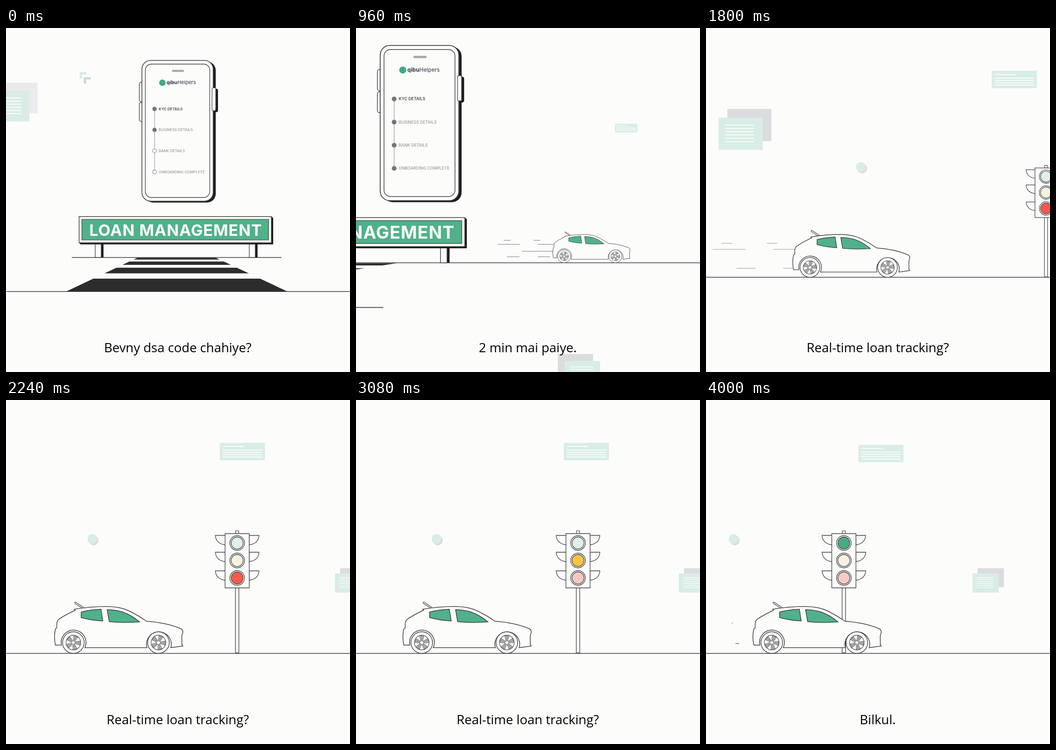
Write an HTML page with a canvas that moves like this. It is 748 px wide and 748 px high and loops after 4040 ms.

```html
<!DOCTYPE html>
<html lang="en">
<head>
<meta charset="utf-8">
<title>Loan journey</title>
<style>
html, body { margin: 0; width: 100%; height: 100%; overflow: hidden; background: #fcfdfb; }
canvas { display: block; width: 748px; height: 748px; }
</style>
</head>
<body>
<canvas id="stage" width="748" height="748"></canvas>
<script>
const ctx = document.getElementById('stage').getContext('2d');
const LOOP = 4040, STEP = 40;
const BG = '#fcfdfb', INK = '#3c3d3e', BLACK = '#1e1f20', GREEN = '#50b18a';
const MINT = '#d8ede6', MIST = '#dcdce0';

// Smooth monotone curve through [time, value] points, held at both ends.
function curve(...k) {
  const secant = i => (k[i + 1][1] - k[i][1]) / (k[i + 1][0] - k[i][0]);
  const slope = i => {
    if (i === 0) return secant(0);
    if (i === k.length - 1) return 0;
    const a = secant(i - 1), b = secant(i);
    return a * b > 0 ? 2 * a * b / (a + b) : 0;
  };
  return t => {
    if (t >= k[k.length - 1][0]) return k[k.length - 1][1];
    let i = 0;
    while (t > k[i + 1][0]) i++;
    const h = k[i + 1][0] - k[i][0], u = (t - k[i][0]) / h, v = 1 - u;
    return k[i][1] * v * v * (1 + 2 * u) + k[i + 1][1] * u * u * (3 - 2 * u)
      + h * u * v * (slope(i) * v - slope(i + 1) * u);
  };
}

const pos = v => Math.max(0, v);
const ramp = (t, a, b) => Math.min(1, pos((t - a) / (b - a)));

const carZoom = curve([0, 0.49], [520, 0.545], [960, 0.603], [1360, 0.754], [2240, 1]);
const carX = curve([0, 440], [520, 542], [960, 564], [1360, 495.5], [2240, 331.5], [3080, 328]);
const ground = t => 551 - 102 * (1 - carZoom(t));
// How far the opening scene has slid to the left, and its zoom.
const slide = t => 340 * (t / 960) ** 4.6;
const signZoom = t => 1 + 0.103 * (t / 960) ** 3;
// Distance left to the traffic light's stop: braking, then setting off again.
const start = t => pos((t - 3322) / 678) ** 3;
const pan = t => 1000 * pos((2567 - t) / 1207) ** 3 - 183 * start(t);

function paint(fill, stroke, width = 1.4) {
  if (fill) { ctx.fillStyle = fill; ctx.fill(); }
  if (stroke) { ctx.strokeStyle = stroke; ctx.lineWidth = width; ctx.stroke(); }
}
function box(x, y, w, h, fill, stroke, width, r = 0) {
  ctx.beginPath();
  ctx.roundRect(x, y, w, h, r);
  paint(fill, stroke, width);
}
function disc(x, y, r, fill, stroke, width) {
  ctx.beginPath();
  ctx.arc(x, y, r, 0, 7);
  paint(fill, stroke, width);
}
function line(x0, y0, x1, y1, color = INK, width = 1.6) {
  ctx.beginPath();
  ctx.moveTo(x0, y0);
  ctx.lineTo(x1, y1);
  paint(null, color, width);
}
function poly(points, fill) {
  ctx.beginPath();
  points.forEach(p => ctx.lineTo(...p));
  ctx.closePath();
  paint(fill);
}
function label(str, x, y, font, color, align = 'left') {
  ctx.font = font;
  ctx.fillStyle = color;
  ctx.textAlign = align;
  ctx.fillText(str, x, y);
}
function group(draw, x, y, s, alpha = 1) {
  ctx.save();
  ctx.translate(x, y);
  ctx.scale(s, s);
  ctx.globalAlpha = alpha;
  draw();
  ctx.restore();
}

// Two overlapping sheets; x, y is the corner of the front one.
function sheets(x, y, s, side = 1, back = MIST) {
  group(() => {
    box(19 * side, -19, 96, 70, back);
    box(0, 0, 96, 70, MINT);
    for (let i = 0; i < 6; i++) line(15, 16 + i * 7.2, 77, 16 + i * 7.2, '#fbfdf6', 2.2);
  }, x, y, s);
}
function wideCard(x, y, s, alpha = 1) {
  group(() => {
    box(0, 0, 98, 38, MINT);
    line(6, 8, 54, 8, '#fbfdfb', 1.8);
    for (let i = 0; i < 4; i++) line(6, 16 + i * 5, 92, 16 + i * 5, '#fbfdfb', 1.8);
  }, x, y, s, alpha);
}
function corner(x, y, color) {
  box(x, y, 15, 5, color);
  box(x, y, 5.5, 14, color);
}

function scenery(t) {
  const d = pan(t), e = slide(t), u = t - 960;
  if (u < 0) {
    sheets(-40 - 1.25 * e, 137, 0.945, 1, '#ebebed');
    corner(169 - e, 107, '#d6d6d8');
    corner(160 - e, 96, MINT);
  }
  if (Math.abs(u) < 320) sheets(454 - 0.9 * u, 724 + 0.0006 * u * u, 0.8, -1);
  wideCard(563, 208, 0.5, pos(1 - Math.abs(u) / 160));
  sheets(518 + 0.66 * (d - 1000), 195, 1);
  wideCard(452 + 0.66 * d, 93 + 4.5 * start(t), 1);
  sheets(702 + 0.67 * d, 377, 0.595);
  disc(178 + 0.63 * d, 305.5, 10.5, '#dcdcdc');
  disc(175 + 0.63 * d, 302, 10.5, MINT);
}

function road(t) {
  const g = ground(t), e = slide(t), h = 74 + 0.068 * e;
  line(143 - 1.13 * e, g, 599 + 0.23 * t, g);
  line(-5, g + h, 780 - 2.12 * e, g + h);
  const left = y => 287 - 1.12 * e - (2.11 + 0.026 * e) * y;
  const right = y => 455 - 1.06 * e + (2.12 - 0.0253 * e) * y;
  for (const [a, b] of [[0.01, 0.06], [0.12, 0.216], [0.3, 0.466], [0.622, 1]]) {
    const p = a * h, q = b * h;
    poly([[left(p), g + p], [right(p), g + p], [right(q), g + q], [left(q), g + q]], '#2b2c2c');
  }
}

function board() {
  for (const x of [194, 529]) {
    box(x + 12, 468, 6, 31, BLACK);
    box(x, 466, 13, 33, BG, INK, 1.3);
  }
  poly([[577, 410], [581, 413], [581, 470.5], [162, 470.5], [159, 467]], BLACK);
  box(159, 410, 418, 57, BG, INK, 1.4);
  box(165, 416, 406, 45, GREEN, INK, 1.2);
  ctx.letterSpacing = '0.9px';
  label('LOAN MANAGEMENT', 369, 451.7, '700 34.6px Inter, sans-serif', '#fafdfb', 'center');
  ctx.letterSpacing = '0px';
}

function phone(t) {
  box(290, 118, 8, 42, BG, INK, 1.3, 4);
  box(290, 162, 8, 41, BG, INK, 1.3, 4);
  box(450, 132, 11, 51, BLACK, null, 0, 4);
  box(301, 73, 155, 306.5, BLACK, null, 0, 19);
  box(295.5, 70.5, 155, 306, BG, INK, 1.6, 19);
  box(448, 130, 8, 50, BG, INK, 1.2, 3);
  box(303, 78.5, 140, 290, BG, INK, 1.3, 13);
  box(361, 91, 26, 4.5, '#a8a8a8', null, 0, 2);
  disc(340, 119, 7, '#3fab87');
  label('qibu', 349, 122.5, '700 11px Inter, sans-serif', '#30354a');
  label('Helpers', 349 + ctx.measureText('qibu').width, 122.5, '400 11px Inter, sans-serif', '#30354a');
  line(323, 176, 323, 313, '#8a8a8a', 1);
  ['KYC DETAILS', 'BUSINESS DETAILS', 'BANK DETAILS', 'ONBOARDING COMPLETE'].forEach((s, i) => {
    const y = 176 + i * 45.6, done = t >= (i - 1) * 190 - 10;
    disc(323, y, 4.2, done ? '#747474' : BG, '#808080', 1.1);
    label(s, 332, y + 2.9, (i ? '500' : '700') + ' 8px Inter, sans-serif', i ? '#989898' : '#5c5c5c');
  });
}

function wheel(x, turn) {
  disc(x, 527.5, 23.5, BG, INK, 1.4);
  disc(x, 527.5, 16, BG, '#58595a', 1.3);
  ctx.save();
  ctx.translate(x, 527.5);
  ctx.rotate(turn);
  for (let i = 0; i < 5; i++) {
    ctx.rotate(Math.PI * 0.4);
    ctx.beginPath();
    ctx.moveTo(-2, -4);
    ctx.lineTo(-4.5, -14.5);
    ctx.lineTo(4.5, -14.5);
    ctx.lineTo(2, -4);
    paint('#bdbdbf', '#5d5e60', 1);
    line(0, -5, 0, -14, '#6c6d6f', 1);
  }
  ctx.restore();
  disc(x, 527.5, 4, BG, '#5d5e60', 1);
}

const bodyPath = new Path2D(`M104 533 Q100 514 104 498 L107 495 Q106 483 110 478 Q120 470 147 457
  L145 455 Q180 449 215 449 Q245 449 265 459 Q285 469 302 481 Q345 484 376 497 Q382 500 381 506
  Q378 512 379 522 L379 532 L381 535 L355 538.5 A27 27 0 1 0 303 538.5 L168 538.5 A27 27 0 1 0 117 533 Z`);
const windows = [
  new Path2D('M160 461 Q180 456 203 455 L207 480.5 Q180 479 160 473 Z'),
  new Path2D('M216.5 456 Q233 456 250 461 Q268 467 287 482.5 Q250 485 221 482 Z')
];

// Dashes streaming off the rear bumper: height, gap, length, phase.
const streaks = [[470, 108, 25, -75], [484.5, 144, 79, -96], [509.5, 600, 115, -9], [529.5, 111, 45, -63]];
function wind(t) {
  ctx.globalAlpha = ramp(t, 600, 700) * (1 - ramp(t, 1700, 1900));
  for (const [y, gap, len, phase] of streaks) {
    const first = (phase - 1.02 * (t - 960)) % gap;
    for (let x = first - 2 * gap; x < 108; x += gap) {
      const a = Math.max(x, -98), b = Math.min(x + len, 108);
      if (b > a) line(a, y, b, y, '#66686c', 1.5);
    }
  }
  ctx.globalAlpha = 1;
}

function car(t) {
  const s = carZoom(t), turn = -pan(t) / 23;
  ctx.save();
  if (t < 1250) {
    // The car drives out from behind the sign's right post.
    const z = signZoom(t);
    ctx.beginPath();
    ctx.rect(signX(t) + 548 * z, 0, 3000, 748);
    ctx.clip();
  }
  ctx.translate(carX(t) - 328 * s, ground(t) - 551 * s);
  ctx.scale(s, s);
  wind(t);
  if (t >= 3960) {
    line(64, 529.5, 72, 529.5, '#55575a', 1.3);
    line(56.5, 485, 58, 485, '#55575a', 1.3);
  }
  ctx.lineCap = 'round';
  line(147.5, 441, 164, 452, INK, 4.4);
  line(147.5, 441, 164, 452, BG, 1.8);
  ctx.lineCap = 'butt';
  ctx.fillStyle = BG;
  ctx.strokeStyle = INK;
  ctx.lineWidth = 1.5;
  ctx.fill(bodyPath);
  ctx.stroke(bodyPath);
  ctx.fillStyle = GREEN;
  for (const w of windows) { ctx.fill(w); ctx.stroke(w); }
  wheel(143, turn);
  wheel(328, turn);
  ctx.restore();
}

function trafficLight(t) {
  const lit = t < 2840 ? 2 : t < 3400 ? 1 : 0;
  box(479, 408, 7.5, 142, BG, INK, 1.3);
  box(479.5, 284.5, 6.5, 6, BG, INK, 1.2);
  for (const dir of [-1, 1]) {
    for (const y of [294.5, 331, 371.5]) {
      ctx.beginPath();
      ctx.moveTo(482.8 + dir * 26, y);
      ctx.lineTo(482.8 + dir * 47.5, y);
      ctx.quadraticCurveTo(482.8 + dir * 46, y + 18, 482.8 + dir * 26, y + 20.5);
      ctx.closePath();
      paint(BG, INK, 1.3);
    }
  }
  box(456.5, 290.5, 52.5, 118, BG, INK, 1.3);
  const on = ['#47ab82', '#fbc540', '#fb594a'], off = ['#deefec', '#f7f2df', '#f7c9c5'];
  for (let i = 0; i < 3; i++) {
    const y = 311 + i * 38;
    disc(482.8, y, 16, BG, INK, 1.3);
    disc(482.8, y, 13, lit === i ? on[i] : off[i], INK, 1.3);
  }
}

function caption(t) {
  const s = t < 560 ? 'Bevny dsa code chahiye?' : t < 1800 ? '2 min mai paiye.'
    : t < 3640 ? 'Real-time loan tracking?' : 'Bilkul.';
  label(s, 373.5, 705, '400 27.9px "Open Sans", "Noto Sans", sans-serif', '#000', 'center');
}

function signX(t) {
  return 449 * (1 - signZoom(t)) - 1.04 * slide(t);
}

function draw(t) {
  ctx.fillStyle = BG;
  ctx.fillRect(0, 0, 748, 748);
  scenery(t);
  const g = ground(t), z = signZoom(t), s = carZoom(t);
  group(() => trafficLight(t), 482.8 + pan(t) - 482.8 * s, g - 551 * s, s);
  road(t);
  car(t);
  if (t < 1400) {
    group(board, signX(t), g - 499 * z, z);
    group(() => phone(t), 541 * (1 - z) - 0.64 * slide(t), g - 499 * z, z);
  }
  caption(t);
}

const begin = performance.now();
function tick() {
  const t = (performance.now() - begin) % LOOP;
  draw(Math.floor(t / STEP) * STEP);
  requestAnimationFrame(tick);
}
tick();
</script>
</body>
</html>
```
